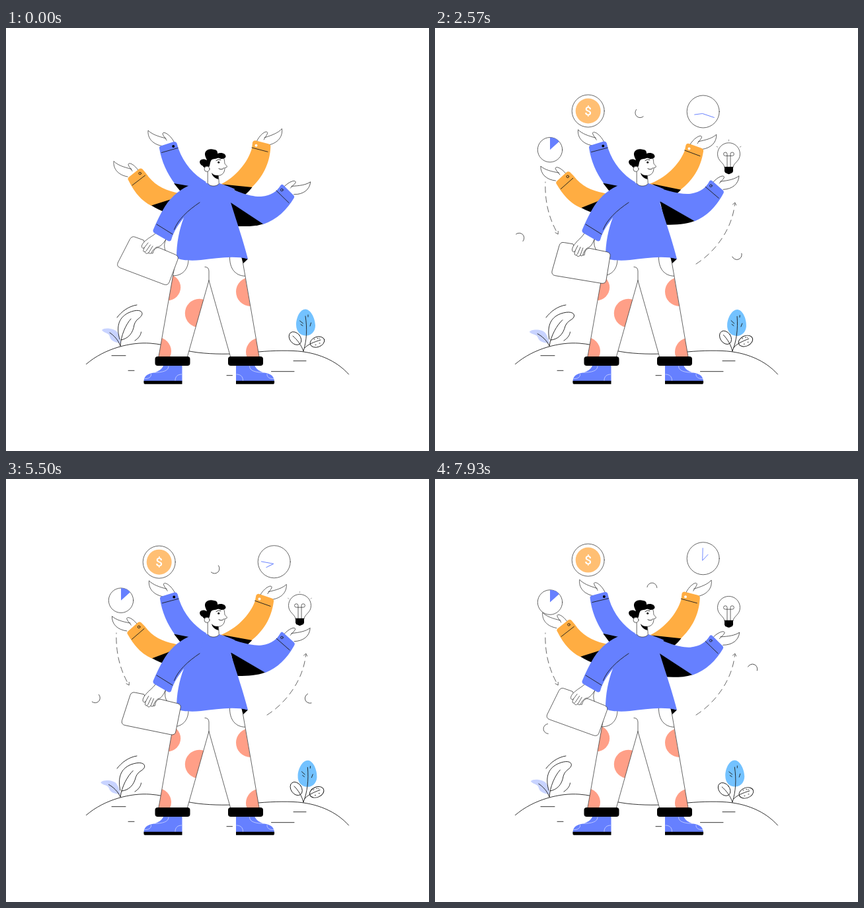
These frames come from a looping animation (640x640 px, 8 s). An HTML page:

```html
<!DOCTYPE html>
<html lang="en">
<head>
<meta charset="utf-8">
<title>Many hands</title>
<style>
  html, body { margin: 0; width: 100%; height: 100%; overflow: hidden; background: #fff; }
  svg { display: block; width: 100vw; height: 100vh; }
  .ln { fill: none; stroke: #1c1c1c; stroke-width: .9; stroke-linecap: round; stroke-linejoin: round; }
  .thin { stroke: #333; stroke-width: .75; }
  .w { fill: #fff; }
  .blue { fill: #6680ff; }
  .orange { fill: #ffad42; }
  .coral { fill: #ff9f87; }
  .pale { fill: none; stroke: #c5d0ff; stroke-width: .9; }
  .hand { fill: none; stroke: #6680ff; stroke-width: .9; }
  .coin { font: 500 19px Roboto, "Open Sans", sans-serif; fill: #fff; text-anchor: middle; }
</style>
</head>
<body>
<svg viewBox="0 0 640 640">
  <defs>
    <g id="palm">
      <path class="w" d="M-12 4C-25 1 -32 -8 -31 -20C-25 -14 -16 -11 -4 -8L-9 -16C-7 -20 3 -13 9 -1L4 8Z"/>
      <path class="ln thin" d="M-10 3.5C-24 1 -32 -8 -31 -20C-25 -14 -16 -11 -4 -8M-3 -5C-5 -9 -8 -11 -9 -15C-8 -20 3 -13 8 -3"/>
    </g>
    <g id="shoe">
      <path class="blue" d="M238 511H266.5V534.5H208.5C209 525 216 523 224 521.5C231 519.5 236 516 238 511Z"/>
      <path d="M208.5 533.7H266.5V538.8H210Q208 538.8 208.5 533.7Z"/>
      <path class="pale" d="M256 533.5C256 527 260 524 266 524M209.5 530.5C216 531 220 528 219.5 523.5M223 521.5C237 521 246 519 246 511.5"/>
    </g>
    <clipPath id="legs"><path d="M257 350L231 497H274.5L307 382L339.5 497H383L357 350Z"/></clipPath>
  </defs>

  <!-- ground -->
  <path class="ln" d="M121.5 508.5C150 484 190 475 218 477C245 479 265 488 290 491C315 494 340 493.5 360 492C390 489 410 487.5 435 488.5C470 490 500 503 518.5 524"/>
  <path class="ln" d="M160 495.7H181M185 518.3H194M334 525.7H342.5M401.5 519.7H436M435 503.7H454"/>

  <!-- data-sway: degrees at full swing, then the pivot -->
  <!-- left plant -->
  <path class="ln" d="M168 438C175 429 185 421 198 419M195 473C200 470 204 465 204.5 460"/>
  <g data-sway="-7.5 173 481">
    <path fill="#c8d3ff" d="M145 457C149 452 166 455 169 461C172 466 173 472 173.5 477C165 476 158 473 157 467C156 461 148 462 145 457Z"/>
    <path class="ln" d="M157 461C163 465 170 472 173 481"/>
  </g>
  <path data-sway="7.5 173 481" class="ln" d="M172 471C167 454 169 439 185 431C198 425 206 427 206 432.5C205 439 197 439 194 449C192 462 185 470 174 472M173 481C174 465 181 449 189 440"/>

  <!-- right plant -->
  <g data-sway="6 450 489">
    <path fill="#73c2ff" d="M453 425.5C462 426 468 441 468 450C468 460 461 465.5 454 465.5C446 465.5 439 460 439 449C439 438 445 425.5 453 425.5Z"/>
    <path class="ln" d="M453 436C456 455 455 473 450 489M444.5 443l5 4M446 448.5l3 2M457 434v3M461.5 446l-1.5 5"/>
  </g>
  <g data-sway="8 450 489" class="ln">
    <ellipse class="ln w" cx="437.5" cy="469.5" rx="8" ry="11" transform="rotate(-40 437.5 469.5)"/>
    <path d="M434 466C441 472 447 480 450 489"/>
  </g>
  <g data-sway="-5.5 450 489" class="ln">
    <ellipse class="ln w" cx="471" cy="475" rx="11.2" ry="7.7" transform="rotate(-20 471 475)"/>
    <path d="M476 472C466 475 456 479 452 484M466 471h1M471 469.5h1M474 477h1M468 479.5h1M474 470h.5"/>
  </g>

  <!-- arms behind the body -->
  <g data-sway="-5.4 270 250">
    <use href="#palm" transform="translate(194 221.5)"/>
    <path class="orange" d="M185 230Q183.5 227.5 186 225.5L201 213.5Q204 211.5 206.5 213.5L212 220C223 237 240 246 262 250L252 264L220 269C204 261 194 248 185 230Z"/>
    <path d="M220 268.5L247 260L266 255L244 280C235 277 227 273 220 268.5Z"/>
    <path class="ln" d="M191 238L210.5 223"/><circle class="ln" cx="202.7" cy="220" r="1.8"/>
  </g>
  <g id="coinArm">
    <use href="#palm" transform="translate(246 175)"/>
    <path class="blue" d="M232 182Q231.5 179.5 234 178.5L254 172Q257.5 171.5 258.5 174.5L261 183C269 205 284 222 303 233L276 252L264 246.5C247 227 236 206 232 182Z"/>
    <path d="M254 235L277 239L268 250L263 246Z"/>
    <path class="ln" d="M235.5 188.5L260 181.5"/><circle cx="253.2" cy="179" r="2"/>
  </g>
  <g data-sway="7.8 335 240">
    <use href="#palm" transform="translate(387.5 174) rotate(-3) scale(-1 1)"/>
    <path class="orange" d="M373 173Q374 169.7 377.5 170.3L397 175.3Q400.7 176.5 400.3 180C399 206 388 226 371 242L322 238C348 226 366 203 372 182Z"/>
    <path d="M328 236.5L372.5 241Q368 247 361 253Z"/>
    <path class="ln" d="M372 181L396 187.3"/><circle class="w" cx="378.5" cy="177.8" r="2"/>
  </g>

  <!-- trousers and shoes -->
  <path class="w" d="M257 345L231 499H274L307 382L340 499H383L357 345Z"/>
  <g class="coral" clip-path="url(#legs)">
    <circle cx="244.5" cy="392.5" r="19.7"/><circle cx="292.5" cy="431.5" r="21.7"/>
    <circle cx="370" cy="399" r="22"/><circle cx="229" cy="489" r="21"/><circle cx="384" cy="490" r="21"/>
  </g>
  <path class="ln thin" d="M257 350L231 497M307 382L274.5 497M307 382L339.5 497M357 347L383 497M301 361.5Q307 361.5 307 368V382M276 350C276 366 266 375 253 374.8M338.5 346C338 364 347 375 361.5 375.3"/>
  <rect x="225.5" y="497" width="53" height="14" rx="4"/><rect x="336" y="497" width="53" height="14" rx="4"/>
  <use href="#shoe"/><use href="#shoe" transform="translate(614.5 0) scale(-1 1)"/>

  <g data-sway="-5 320 240">
    <use href="#palm" transform="translate(426.5 246.5) rotate(11) scale(-1 1)"/>
    <path class="blue" d="M318 234C345 246 370 256 386 255C402 253.5 410 247 415.5 238Q417.5 235.5 420 238L435 253Q437 255 435.5 257.5C425 275 410 290 389 297L338 266Z"/>
    <path d="M339 263.5L389 296.5C376 300.5 362 300.5 345 299.5Z"/>
    <path class="ln" d="M409 246L428 264.5"/><circle class="ln" cx="417.3" cy="245" r="1.8"/>
  </g>

  <!-- body and head -->
  <path d="M356 346L366 349.5L359 356Z"/>
  <path class="blue" d="M300 233C308 237 316 237 323 235C331 237.5 339 240.5 346 243.5L340 264C349 293 360 325 366 349.5C345 344 320 348 295 351C280 352.5 265 351.5 258 348C258 325 262 305 269 287L272 255Z"/>
  <path class="ln thin w" d="M305.2 212V234.5C308 241 320 240 322.3 235.3L321.3 220"/>
  <path class="w" d="M308 196L328.5 196C331 200 331 203 331.2 205.5L334.3 210L331 212C331 220 326 224 319 223.3C313 222.5 307 219 306 213Z"/>
  <path class="ln thin" d="M329.5 197C331 200 330.5 203 331 205.5Q335 209 334.3 210.3L331 211.8C331 220 326 224 319 223.3"/>
  <path d="M311 219C314 222.5 317.5 223.3 321 223L321.6 229C316 227.5 312 224 311 219Z"/>
  <path d="M301.5 194C299 186 306 181.5 315 184C318.5 184 320.5 187 320 190C326 187.5 333 190 332.5 195C330 199 325 198.5 321 196.5C316 199 312 197 310 201C308 205 309 209 306 212C301 212.5 298.5 210.5 297.5 208.5C292 206 291.5 199.5 297 198.7C300 198 301 198.5 304 200Z"/>
  <circle class="ln thin w" cx="304" cy="213.3" r="4"/>
  <path class="ln" d="M318 200.5Q321 198 325 199.5M322 212.8Q327 215.5 330 211.5"/><circle cx="321.7" cy="203.3" r="1.5"/>

  <!-- case and the arm that carries it -->
  <g data-sway="-15.3 237 322" class="ln thin">
    <path class="ln thin w" d="M208 321L196 316.5Q190.5 314 187.5 319.5L169.3 355Q167 360.5 172.5 362.8L239 388Q245 390 247 384.5L260 350Q261.5 345.5 256.5 343L233 333C228 331 224 334 222 341L214 340Z"/>
    <path class="ln thin w" d="M230 307C224 314 218 316 214 319.5C209 323 204.5 328 205.5 331.5C206 334 209 333 209.5 332C206.5 337 208 340 210.5 338C210.5 342 214 342 216 339.5C217 343 220 341 221 338C224 334 227 331 231 331C236 329 240 323 243 318Z"/>
    <path d="M209.5 332L215 325M212 337.5L218.5 328M216.5 339L222 330M243 318C239 325 239 331 241 336.5"/>
  </g>
  <path class="blue" d="M302 232.5C271 234.5 249 254 237.5 275C230 288 225 300 222.5 306Q222 309 225 310.5L245 322Q249.5 324 250.5 319C254 308 259 300 269 287L293 264Z"/>
  <path class="ln" d="M228 297L252 312M254.5 305C260 290 275 276 293 264"/>

  <!-- floating things -->
  <g id="arrows" class="ln thin">
    <path stroke-dasharray="9 6" stroke-dashoffset="8" d="M167 233C166 262 172 287 185 310"/>
    <path d="M182 309.5L186.2 312L186.3 307.5"/>
    <path stroke-dasharray="9 6.5" d="M395 357C425 338 450 303 453.5 266"/>
    <path d="M450.5 267L453.8 264L455.7 268"/>
  </g>
  <g id="curls"></g>
  <g id="coin">
    <circle class="ln thin w" r="24.5"/><circle r="19" fill="#ffbf73"/><text class="coin" y="6.8">$</text>
  </g>
  <g id="clock">
    <circle class="ln thin w" r="24.5"/>
    <path id="long" class="hand" d="M0 0V-19"/><path id="short" class="hand" d="M0 0V-12.5"/>
  </g>
  <g id="pie">
    <circle class="ln thin w" r="18.7"/><path class="blue" d="M0 0V-18.7A18.7 18.7 0 0 1 13.9 -12.5Z"/>
  </g>
  <g id="bulb">
    <path class="ln thin w" d="M-6.5 20C-7 13 -17 11 -17 0A17 17 0 0 1 17 0C17 11 7 13 6.5 20Z"/>
    <path class="ln thin" d="M-2.5 20V0A2.7 2.7 0 1 0 -5 2.7H5A2.7 2.7 0 1 0 2.5 0V20"/>
    <path d="M-6.5 19.3H6.5V26Q6 28.7 3 29.3Q0 31.5 -3 29.3Q-6 28.7 -6.5 26Z"/>
    <g id="rays" class="ln thin"></g>
  </g>
</svg>
<script>
const LOOP = 8000, TURN = 2 * Math.PI;
const $ = id => document.getElementById(id);
const place = (el, v) => el.setAttribute("transform", v);
const ramp = (t, a, b) => Math.max(0, Math.min(1, (t - a) / (b - a)));
const mix = (a, b, p) => a + (b - a) * p;
const easeOut = p => 1 - (1 - p) ** 3;

// 0..1..0 every two seconds: quick to rise, late to fall
function swing(t) {
  const s = t % 2000 / 1000, p = s % 1;
  const soft = (1 - Math.cos(Math.PI * p)) / 2;
  return s < 1
    ? mix(soft, Math.sin(p * Math.PI / 2), .75)
    : 1 - mix(soft, 1 - Math.cos(p * Math.PI / 2), .5);
}

const node = (name, parent, attrs) => {
  const el = document.createElementNS("http://www.w3.org/2000/svg", name);
  for (const k in attrs) el.setAttribute(k, attrs[k]);
  return parent.appendChild(el);
};

const swaying = [...document.querySelectorAll("[data-sway]")].map(el => {
  const [angle, x, y] = el.dataset.sway.split(" ");
  return { el, angle, x, y };
});

// each curl drifts out to its far point and back while spinning
const curls = [
  { start: [315, 147.5], far: [308, 118.5], end: [328.5, 165], angle: -104, spin: 1 },
  { start: [155, 345], far: [113.5, 304], end: [172, 378.5], angle: 195, spin: -1 },
  { start: [474, 314], far: [448, 357.5], end: [480.5, 287], angle: 310, spin: -1 }
];
for (const c of curls)
  c.el = node("path", $("curls"), { class: "ln thin", d: "M.65 -7.47A7.5 7.5 0 0 1 .65 7.47" });

const rays = [-58, 0, 58].map(angle => ({ angle, el: node("path", $("rays"), { d: "M0 0V-2" }) }));

function drift(c, t) {
  const out = ramp(t, 0, 3860), back = ramp(t, 3860, 7960) ** 1.1;
  return [0, 1].map(i => mix(mix(c.start[i], c.far[i], out), c.end[i], back));
}

function draw(t) {
  const s = swing(t);
  const drop = (a, b, y) => mix(-30, y, easeOut(ramp(t, a, b)));
  const coinY = 124.4 - 1.8 * Math.cos(TURN * t / 4000) + 5 * (1 - easeOut(ramp(t, 0, 800)));
  const pieY = 181.3 + 4 * s + 5 * ramp(t, 7800, 7930);

  for (const { el, angle, x, y } of swaying) place(el, `rotate(${angle * s} ${x} ${y})`);
  place($("coinArm"), `rotate(${(127.6 - coinY) * .5} 280 240)`);

  place($("coin"), `translate(231.7 ${drop(0, 650, coinY)})`);
  place($("clock"), `translate(405.7 ${drop(100, 800, 119.7 + 9.2 * s)})`);
  place($("long"), `translate(-1 3) rotate(${2 + .1815 * t})`);
  place($("short"), `translate(-1 3) rotate(${52 + .362 * t})`);
  place($("bulb"), `translate(444.5 ${194.8 - 5.5 * s}) scale(${easeOut(ramp(t, 300, 850))})`);
  place($("pie"), `translate(174 ${pieY}) scale(${ramp(t, 900, 1300)})`);

  for (const r of rays) place(r.el, `rotate(${r.angle}) translate(0 ${-17.5 - 3 * s})`);
  $("rays").style.opacity = .7 * ramp(s, .15, .8);
  $("arrows").style.opacity = ramp(t, 250, 800);
  $("curls").style.opacity = ramp(t, 0, 350);
  for (const c of curls) place(c.el, `translate(${drift(c, t)}) rotate(${c.angle + c.spin * .093 * t})`);
}

const start = performance.now();
function tick() {
  draw((performance.now() - start) % LOOP);
  requestAnimationFrame(tick);
}
draw(0);
requestAnimationFrame(tick);
</script>
</body>
</html>
```
